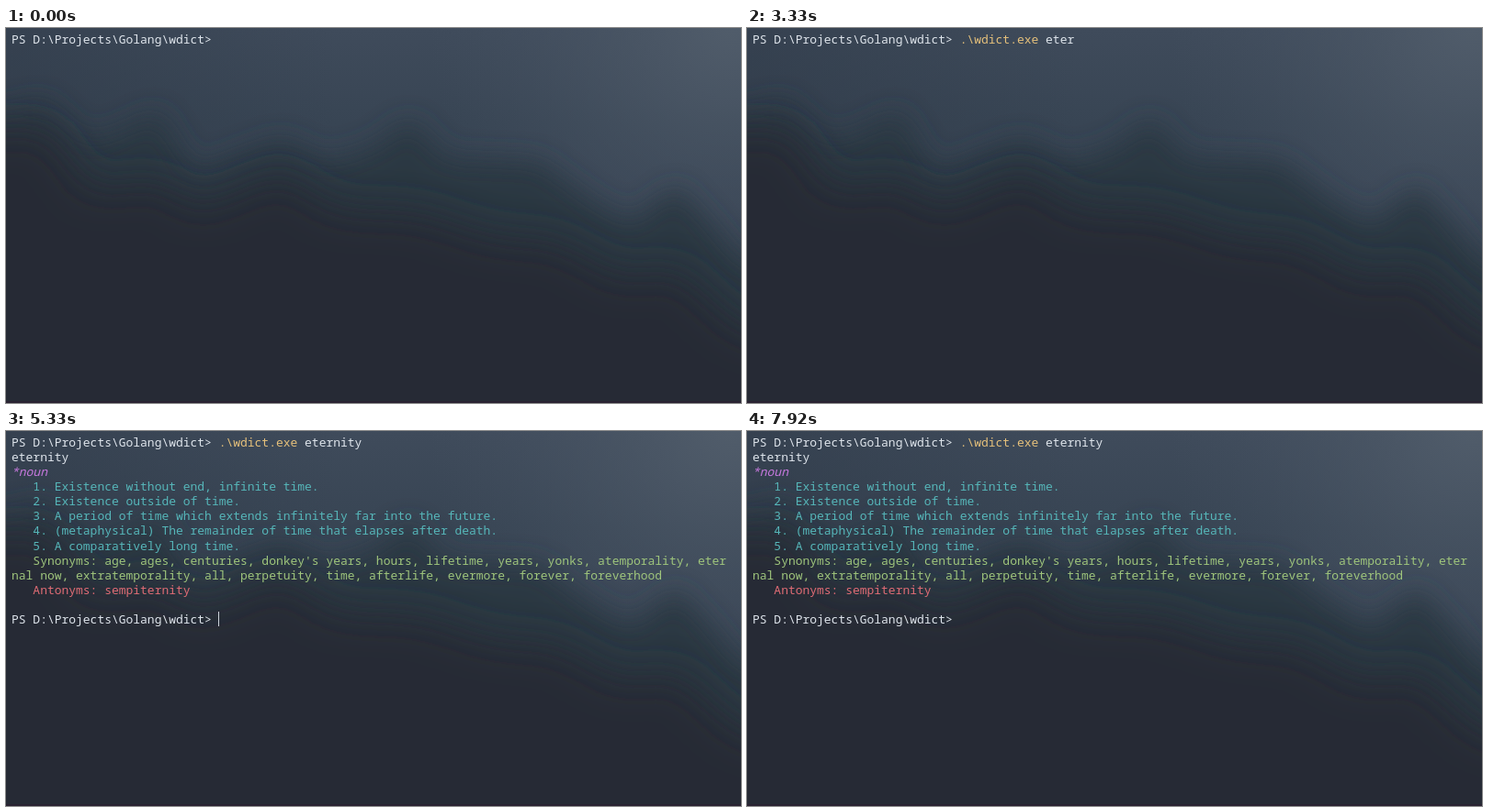
An HTML page that plays this animation: 800 by 409 pixels, repeating every 8000 ms.

```html
<!DOCTYPE html>
<html lang="en">
<head>
<meta charset="utf-8">
<title>Terminal dictionary</title>
<style>
  html, body { margin: 0; width: 100%; height: 100%; overflow: hidden; background: #262a34; }
  svg { position: absolute; left: 0; top: 0; }
  pre {
    position: absolute; left: 6px; top: 4px; margin: 0; color: #dfe5ec;
    font: 12.97px/16.08px "Noto Sans Mono", "DejaVu Sans Mono", monospace;
    font-variant-ligatures: none;
  }
  .cmd { color: #e5c07b; }
  .pos { color: #c678dd; font-style: italic; }
  .def { color: #56b6b9; }
  .syn { color: #9fc57c; }
  .ant { color: #e06c75; }
  #cursor { position: absolute; width: 1px; height: 16px; background: #ccd3db; }
</style>
</head>
<body>
<svg width="800" height="409" viewBox="0 0 800 409">
  <defs>
    <linearGradient id="sky" x2="0" y2="1">
      <stop offset="0" stop-color="#3f4b5b"/>
      <stop offset=".25" stop-color="#384554"/>
      <stop offset=".5" stop-color="#374353"/>
      <stop offset=".75" stop-color="#2d3946"/>
    </linearGradient>
    <radialGradient id="glow" gradientUnits="userSpaceOnUse" cx="790" cy="-10" r="330">
      <stop offset="0" stop-color="#515d6b"/>
      <stop offset="1" stop-color="#465262" stop-opacity="0"/>
    </radialGradient>
    <linearGradient id="shade">
      <stop offset="0" stop-color="#2e3947" stop-opacity=".55"/>
      <stop offset=".45" stop-color="#2e3947" stop-opacity="0"/>
    </linearGradient>
    <filter id="soft" filterUnits="userSpaceOnUse" x="-100" y="0" width="1000" height="560">
      <feGaussianBlur stdDeviation="15"/>
    </filter>
    <filter id="softer" filterUnits="userSpaceOnUse" x="-100" y="0" width="1000" height="560">
      <feGaussianBlur stdDeviation="21"/>
    </filter>
  </defs>
  <rect width="800" height="409" fill="url(#sky)"/>
  <rect width="800" height="409" fill="url(#shade)"/>
  <rect width="800" height="409" fill="url(#glow)"/>
  <path filter="url(#soft)" fill="#2c3743" d="M-90 90L0 92 40 80 90 125 130 110 165 92 205 158 250 140 300 122 350 146 400 130 440 100 480 142 580 146 640 190 680 212 730 174 765 212 800 255 890 280V550H-90Z"/>
  <path filter="url(#softer)" fill="#262a34" d="M-90 105L0 110 45 108 95 175 165 165 210 195 300 158 360 196 450 200 530 226 600 232 670 270 730 262 800 325 890 350V550H-90Z"/>
  <rect y="407" width="800" height="2" fill="#2a2232"/>
</svg>
<pre id="screen"></pre>
<div id="cursor"></div>
<script>
const LOOP = 8000, COL = 7.78, ROW = 16.08;
const PROMPT = 'PS D:\\Projects\\Golang\\wdict> ';
const PROGRAM = '.\\wdict.exe', COMMAND = PROGRAM + ' eternity';

// [time, characters typed]; the program name is tab-completed
const KEYS = [[1830, 1], [1920, 2], [2080, 3], [2170, 11], [2330, 12], [2580, 13],
  [2830, 14], [2920, 15], [3080, 16], [3420, 17], [3500, 18], [3670, 19], [3750, 20]];
const BLINKS = [80, 500, 830, 1170, 1580, 3330, 3420, 4080, 4670, 5000, 5330,
  5750, 6080, 6420, 6830, 7170, 7580, 7920];
const ENTER = 3920, OUTPUT = 4330;

const span = (name, text) => `<span class="${name}">${text}</span>`;
const RESULT = [
  '', 'eternity',
  span('pos', '*noun'),
  span('def', `   1. Existence without end, infinite time.
   2. Existence outside of time.
   3. A period of time which extends infinitely far into the future.
   4. (metaphysical) The remainder of time that elapses after death.
   5. A comparatively long time.`),
  span('syn', `   Synonyms: age, ages, centuries, donkey's years, hours, lifetime, years, yonks, atemporality, eter
nal now, extratemporality, all, perpetuity, time, afterlife, evermore, forever, foreverhood`),
  span('ant', '   Antonyms: sempiternity'),
  '', PROMPT.replace('>', '&gt;')
].join('\n');

const screen = document.getElementById('screen');
const cursor = document.getElementById('cursor');
let shown, start;

function draw(t) {
  const typed = KEYS.reduce((n, [at, count]) => t >= at ? count : n, 0);
  const done = t >= OUTPUT;
  const html = PROMPT.replace('>', '&gt;') +
    span('cmd', COMMAND.slice(0, Math.min(typed, PROGRAM.length))) +
    COMMAND.slice(PROGRAM.length, Math.max(typed, PROGRAM.length)) +
    (done ? RESULT : '');
  if (html !== shown) screen.innerHTML = shown = html;

  const [col, row] = done ? [PROMPT.length, 12] : t >= ENTER ? [0, 1] : [PROMPT.length + typed, 0];
  cursor.style.left = Math.floor(6 + col * COL) + 'px';
  cursor.style.top = Math.round(4.5 + row * ROW) + 'px';
  cursor.style.visibility = BLINKS.filter(at => t >= at).length % 2 ? 'visible' : 'hidden';
}

function tick(now) {
  start ??= now;
  draw((now - start) % LOOP);
  requestAnimationFrame(tick);
}
draw(0);
requestAnimationFrame(tick);
</script>
</body>
</html>
```
